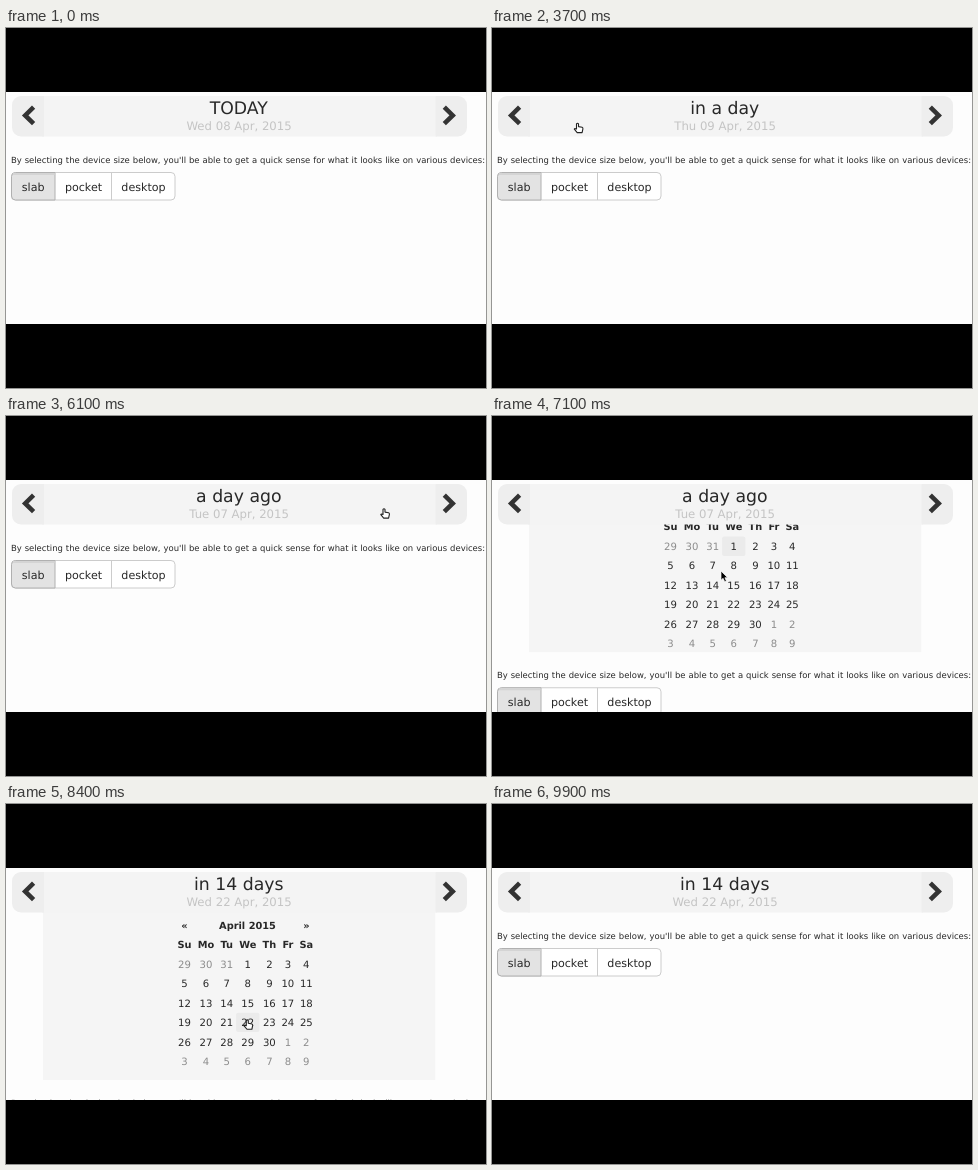
Write an HTML page that moves like this. It is 480 px wide and 360 px high and loops after 10 s.

```html
<!DOCTYPE html>
<html lang="en">
<head>
<meta charset="utf-8">
<style>
  html, body { margin: 0; width: 100%; height: 100%; overflow: hidden; background: #000; }
  svg { display: block; }
  text { font-family: "DejaVu Sans", Verdana, sans-serif; fill: #282828; text-rendering: geometricPrecision; }
  .mid { text-anchor: middle; }
  #calendar text { font-size: 10.1px; text-anchor: middle; }
  #calendar .bold { font-weight: bold; font-size: 9.8px; }
  #calendar .muted { fill: #8c8c8c; }
  .chevron { fill: none; stroke: #333; stroke-width: 4.6; }
</style>
</head>
<body>
<svg width="480" height="360" viewBox="0 0 480 360">
  <rect y="64" width="480" height="232" fill="#fdfdfd"/>

  <g id="below">
    <text x="4.9" y="135" font-size="8.46" word-spacing=".29">By selecting the device size below, you'll be able to get a quick sense for what it looks like on various devices:</text>
    <rect x="5.5" y="144.5" width="163.5" height="27.5" rx="4" fill="#fff" stroke="#ccc"/>
    <path d="M105.5 144.5v27.5" stroke="#ccc"/>
    <path d="M49 144.5H9.5a4 4 0 0 0-4 4v19.5a4 4 0 0 0 4 4H49z" fill="#e3e3e3" stroke="#b0b0b0"/>
    <path d="M7 146H48.5" stroke="#d4d4d4" stroke-width="2"/>
    <g class="mid" font-size="11.1">
      <text x="27.2" y="162.5">slab</text>
      <text x="77.5" y="162.5">pocket</text>
      <text x="137.5" y="162.5">desktop</text>
    </g>
  </g>

  <svg id="calendar" x="37" y="108" width="392.5" height="168">
    <rect width="392.5" height="168" fill="#f5f5f5"/>
    <g id="month"><rect id="hover" rx="2" fill="#ebebeb"/></g>
  </svg>

  <rect x="36" y="68" width="395" height="40.5" fill="#f4f4f4"/>
  <path id="prev" d="M38 68H15a9 9 0 0 0-9 9v22.5a9 9 0 0 0 9 9h23z"/>
  <path id="next" d="M429.5 68H452a9 9 0 0 1 9 9v22.5a9 9 0 0 1-9 9h-22.5z"/>
  <path class="chevron" d="M27.6 79.2l-8.4 8.2 8.4 8.2"/>
  <path class="chevron" d="M438.3 79.2l8.4 8.2-8.4 8.2"/>
  <text id="title" class="mid" x="232.8" y="86" font-size="17.3"/>
  <text id="date" class="mid" x="233.1" y="102.3" font-size="11.7" style="fill:#c4c4c4"/>

  <g id="cursor">
    <path id="arrow" d="M0 0V9.2L2.1 7.3 3.7 10.8 5.4 10 3.9 6.7H6.6z" stroke="#fff" stroke-width=".7"/>
    <path id="hand" d="M-1 6V.9Q0-.4 1 .9V3.6L4.6 4.3Q5.5 4.6 5.4 5.8L4.6 9.6H-.3L-3.2 6.2Q-3.3 4.8-1 6z" fill="#fff" stroke="#222" stroke-width="1.1" stroke-linejoin="round"/>
  </g>
  <path d="M0 0H480V64H0zM0 296H480V360H0z"/>
</svg>
<script>
const $ = id => document.getElementById(id);
const LOOP = 10000, STEP = 100, SLIDE = 490, OPEN_AT = 6750, CLOSE_AT = 8433;
const PANEL_X = 37, PANEL_Y = 108, FULL = 168, CONTENT = 158;
const ROW = 19.45, FIRST_ROW = 52, CELL_PADDING = 6.2;

// when a click lands, and the day it leads to
const clicks = [[0, 0], [3200, 1], [4100, 0], [5300, -1], [8400, 14]];

const prev = [22, 91], next = [440, 91], header = [240, 84], text = [180, 146];
const stops = [
  [100, [140, 284]], [400, prev], [1100, next], [1800, prev], [2200, text], [2400, header],
  [2700, text], [3100, next], [3300, next], [3700, [85.5, 95]], [3900, prev], [4200, prev],
  [4700, text], [5200, prev], [5400, prev], [6100, [378, 92.5]], [6700, header],
  [7100, [229, 155]], [7600, [225, 229]], [8300, [243, 217]], [8800, [225, 203]],
  [9500, [40, 235]], [9800, [466, 110]]
];

function label(content, x, y, className) {
  const node = document.createElementNS('http://www.w3.org/2000/svg', 'text');
  node.textContent = content;
  node.setAttribute('x', x);
  node.setAttribute('y', y + 3.7);
  node.setAttribute('class', className);
  $('month').append(node);
  return node;
}

// each column is as wide as its heading plus padding
let edge = 131.4;
const columns = ['Su', 'Mo', 'Tu', 'We', 'Th', 'Fr', 'Sa'].map(name => {
  const heading = label(name, 0, 32.5, 'bold');
  const width = heading.getComputedTextLength() + CELL_PADDING;
  const column = { left: edge, width, center: edge + width / 2 };
  heading.setAttribute('x', column.center);
  edge += width;
  return column;
});
label('«', columns[0].center, 13, 'bold');
label('April 2015', 204.5, 13, 'bold');
label('»', columns[6].center, 13, 'bold');
for (let i = 0; i < 42; i++) {
  const date = new Date(2015, 2, 29 + i);
  label(date.getDate(), columns[i % 7].center, FIRST_ROW + ROW * Math.floor(i / 7),
    date.getMonth() === 3 ? '' : 'muted');
}

const swing = p => 0.5 - Math.cos(Math.PI * Math.min(1, Math.max(0, p))) / 2;

function pointerAt(t) {
  const i = Math.max(1, stops.findIndex(([time]) => time >= t));
  const [[t0, from], [t1, to]] = [stops[i - 1], stops[i]];
  return from.map((v, axis) => v + (to[axis] - v) * swing((t - t0) / (t1 - t0)));
}

function calendarHeight(t) {
  if (t >= OPEN_AT + SLIDE && t < CLOSE_AT) return FULL;
  return CONTENT * (swing((t - OPEN_AT) / SLIDE) - swing((t - CLOSE_AT) / SLIDE));
}

// while the panel slides, the first of the month stays lit
function highlight(x, y, open) {
  const column = open ? columns.find(c => x - PANEL_X < c.left + c.width) : columns[3];
  const row = open ? Math.floor((y - PANEL_Y - FIRST_ROW) / ROW + 0.5) : 0;
  const onDay = !!column && row >= 0 && row < 6;
  const box = $('hover');
  box.style.display = onDay ? '' : 'none';
  if (onDay) {
    box.setAttribute('x', column.left);
    box.setAttribute('y', FIRST_ROW + ROW * (row - 0.5));
    box.setAttribute('width', column.width);
    box.setAttribute('height', ROW);
  }
  return open && onDay;
}

function relativeName(days) {
  if (!days) return 'TODAY';
  const span = Math.abs(days) === 1 ? 'a day' : Math.abs(days) + ' days';
  return days > 0 ? 'in ' + span : span + ' ago';
}

function draw(t) {
  const days = clicks.filter(([time]) => time <= t).pop()[1];
  const [weekday, month, day, year] = new Date(2015, 3, 8 + days).toDateString().split(' ');
  $('title').textContent = relativeName(days);
  $('date').textContent = `${weekday} ${day} ${month}, ${year}`;

  const height = calendarHeight(t);
  $('calendar').setAttribute('height', height);
  $('calendar').style.display = height > 0.5 ? '' : 'none';
  $('month').setAttribute('transform', `translate(0 ${Math.min(0, height - CONTENT)})`);
  $('below').setAttribute('transform', `translate(0 ${Math.max(0, height - 1)})`);

  const visible = t >= 100 && t < 9900;
  const [x, y] = pointerAt(Math.min(t, 9800));
  const inHeader = visible && y > 68 && y < 108 && x > 6 && x < 461;
  const onDay = highlight(x, y, height === FULL);
  const hand = inHeader || onDay;
  $('cursor').setAttribute('transform', `translate(${x} ${y})`);
  $('cursor').style.display = visible ? '' : 'none';
  $('hand').style.display = hand ? '' : 'none';
  $('arrow').style.display = hand ? 'none' : '';
  $('prev').style.fill = inHeader && x < 38 ? '#e6e6e6' : '#eee';
  $('next').style.fill = inHeader && x > 429 ? '#e6e6e6' : '#eee';
}

function tick() {
  draw(Math.floor(performance.now() % LOOP / STEP) * STEP);
  requestAnimationFrame(tick);
}
tick();
</script>
</body>
</html>
```
